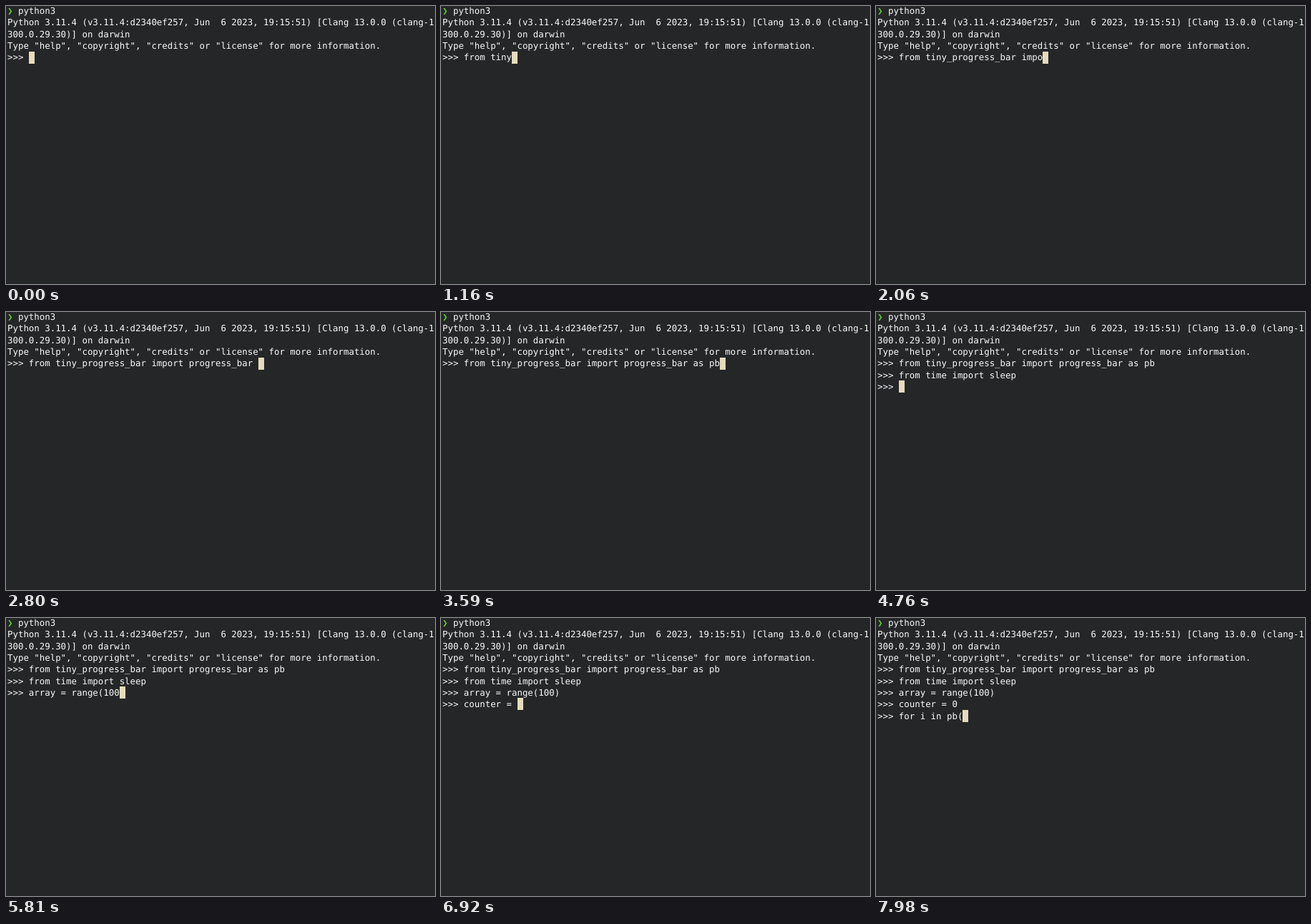
Animation, 600 px wide and 390 px high, one loop 8 s. Source, as an HTML page:

```html
<!DOCTYPE html>
<html lang="en">
<head>
<meta charset="utf-8">
<title>Python session</title>
<style>
  html, body { margin: 0; width: 100%; height: 100%; overflow: hidden; background: #252628; }
  svg { display: block; width: 600px; height: 390px; }
  text {
    font: 12.4px "DejaVu Sans Mono", monospace;
    fill: #fafafa;
    white-space: pre;
    text-rendering: geometricPrecision;
  }
  .prompt { fill: #62d32b; }
  #cursor { fill: #e5dcbc; }
</style>
</head>
<body>
<svg id="term" viewBox="0 0 600 390">
  <rect id="cursor" width="8" height="17"/>
</svg>
<script>
  const LOOP = 8000, KEY = 48;
  const LEFT = 2, CELL = 7.465, ROW = 16.3, TOP = -1.15, BASE = 11.1;
  const PS1 = '>>> ';

  const banner = [
    '  python3',
    'Python 3.11.4 (v3.11.4:d2340ef257, Jun  6 2023, 19:15:51) [Clang 13.0.0 (clang-1',
    '300.0.29.30)] on darwin',
    'Type "help", "copyright", "credits" or "license" for more information.'
  ];

  // Each burst is typed at one key per KEY ms from its start time.
  const bursts = [
    { at: 600, keys: 'from t' },
    { at: 1060, keys: 'iny_progress_bar import progress_bar as pb' },
    { at: 3655, keys: '\nfrom time import sleep\n' },
    { at: 5010, keys: 'array = range(100' },
    { at: 5920, keys: ')\n' },
    { at: 6480, keys: 'counter = ' },
    { at: 6980, keys: '0 \n' },
    { at: 7440, keys: 'for i in pb(' }
  ];

  const term = document.getElementById('term');
  const cursor = document.getElementById('cursor');

  function addLine(row, str, cls) {
    const el = document.createElementNS('http://www.w3.org/2000/svg', 'text');
    el.setAttribute('x', LEFT);
    el.setAttribute('y', BASE + row * ROW);
    if (cls) el.setAttribute('class', cls);
    el.textContent = str;
    term.appendChild(el);
    return el;
  }

  function typedAt(t) {
    return bursts
      .map(b => b.keys.slice(0, Math.max(0, Math.floor((t - b.at) / KEY) + 1)))
      .join('');
  }

  banner.forEach((str, row) => addLine(row, str));
  addLine(0, '❯', 'prompt');
  const input = typedAt(LOOP).split('\n').map((_, i) => addLine(banner.length + i, ''));

  function draw(t) {
    const lines = typedAt(t).split('\n');
    const last = lines.length - 1;
    input.forEach((el, i) => { el.textContent = i <= last ? PS1 + lines[i] : ''; });
    cursor.setAttribute('x', Math.round(LEFT + (PS1.length + lines[last].length) * CELL));
    cursor.setAttribute('y', Math.floor(TOP + (banner.length + last) * ROW));
  }

  const start = performance.now();
  function tick() {
    draw((performance.now() - start) % LOOP);
    requestAnimationFrame(tick);
  }
  tick();
</script>
</body>
</html>
```
